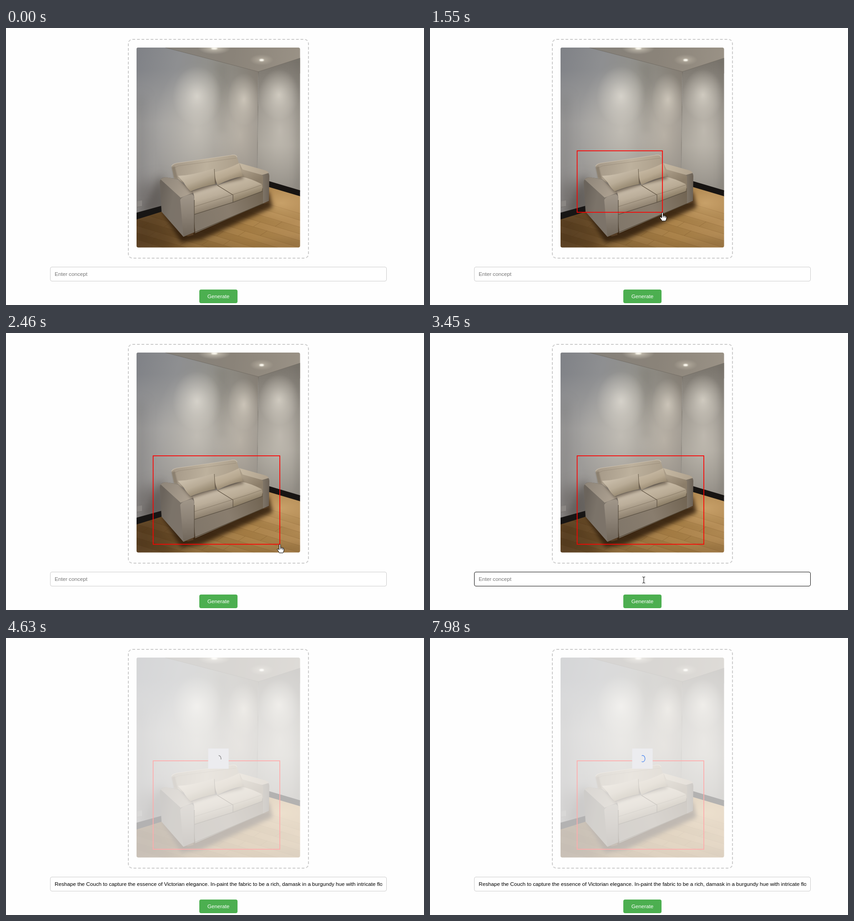
Recreate the animation shown at these times as an HTML page with a canvas. Size 919x609 px, loop 8 s.

```html
<!DOCTYPE html>
<html lang="en">
<head>
<meta charset="utf-8">
<title>Concept editor</title>
<style>
  html, body { margin: 0; width: 100%; height: 100%; overflow: hidden; background: #fefefe; }
  body { position: relative; font: 11.67px/30px "Liberation Sans", Arial, sans-serif; }
  body > * { position: absolute; box-sizing: border-box; }
  canvas { left: 0; top: 0; }
  #drop { left: 268px; top: 24px; width: 398px; height: 483px; border: 2px dashed #ccc; border-radius: 10px; }
  #field { left: 97px; top: 525px; width: 740px; height: 32px; padding: 0 9px; border: 1px solid #ccc; border-radius: 4px; background: #fff; }
  #field.focus { border-color: #101010; }
  #text { overflow: hidden; white-space: pre; color: #757575; }
  #text.typed { color: #000; }
  #button { left: 425px; top: 574.5px; width: 84px; height: 30.5px; border-radius: 4px; background: #4caf50; color: #fff; text-align: center; }
</style>
</head>
<body>
<div id="drop"></div>
<div id="field"><div id="text"></div></div>
<div id="button">Generate</div>
<canvas id="stage" width="919" height="609"></canvas>
<script>
const W = 919, H = 609, LOOP = 8000;
const FOCUS = 3400, PASTE = 3850, BLUR = 4520, LOADING = 4630;
const DRAG = 1210, ORIGIN = [323.5, 270];
const PROMPT = 'Reshape the Couch to capture the essence of Victorian elegance. In-paint the fabric to be a rich, damask in a burgundy hue with intricate floral patterns.';
const ctx = document.getElementById('stage').getContext('2d');
const field = document.getElementById('field');
const text = document.getElementById('text');

// time, x, y of the pointer tip
const pointerPath = [
  [220, 462, 461], [920, 323, 269], [1030, 323, 269], [1120, 318, 259],
  [DRAG, 323, 270], [1550, 510.5, 405], [1720, 592, 443], [1890, 592, 443],
  [2460, 602, 464.5], [2740, 602, 464.5], [2850, 600, 453], [3390, 470, 543],
  [3790, 470, 543], [4020, 466, 590]
];

function pointerAt(t) {
  const i = pointerPath.findIndex(k => k[0] > t);
  if (i < 0) return pointerPath[pointerPath.length - 1].slice(1);
  if (i === 0) return pointerPath[0].slice(1);
  const [t0, x0, y0] = pointerPath[i - 1], [t1, x1, y1] = pointerPath[i];
  const p = (t - t0) / (t1 - t0);
  return [x0 + (x1 - x0) * p, y0 + (y1 - y0) * p];
}

function paintRoom() {
  const room = document.createElement('canvas');
  room.width = W;
  room.height = H;
  const c = room.getContext('2d');

  const ramp = (x0, y0, x1, y1, ...colors) => {
    const g = c.createLinearGradient(x0, y0, x1, y1);
    colors.forEach((color, i) => g.addColorStop(i / (colors.length - 1), color));
    return g;
  };
  const shape = (d, fill, blur = 0) => {
    c.filter = blur ? `blur(${blur}px)` : 'none';
    c.fillStyle = fill;
    c.fill(new Path2D(d));
    c.filter = 'none';
  };
  const line = (d, color, width = 1) => {
    c.strokeStyle = color;
    c.lineWidth = width;
    c.stroke(new Path2D(d));
  };
  const glow = (x, y, rx, ry, rgb, alpha) => {
    c.save();
    c.translate(x, y);
    c.scale(rx, ry);
    const g = c.createRadialGradient(0, 0, 0, 0, 0, 1);
    g.addColorStop(0, `rgba(${rgb},${alpha})`);
    g.addColorStop(0.5, `rgba(${rgb},${alpha * 0.45})`);
    g.addColorStop(1, `rgba(${rgb},0)`);
    c.fillStyle = g;
    c.fillRect(-1, -1, 2, 2);
    c.restore();
  };
  const within = (d, draw) => {
    c.save();
    c.clip(new Path2D(d));
    draw();
    c.restore();
  };

  c.beginPath();
  c.roundRect(287, 43, 359.5, 439.5, 4);
  c.clip();

  // ceiling
  shape('M287 43H647V100H287Z', ramp(350, 43, 647, 80, '#84807a', '#8a8379', '#9a9286'));
  glow(458, 44, 36, 14, '255,248,230', 0.6);
  glow(562, 70, 26, 12, '255,245,225', 0.35);

  // walls
  const leftWall = 'M287 43H350L555 96L552 345L287 412Z';
  within(leftWall, () => {
    shape(leftWall, ramp(287, 60, 555, 120, '#808287', '#8e8f91', '#929089', '#817a70'));
    shape(leftWall, ramp(0, 90, 0, 330, 'rgba(182,178,172,0)', 'rgba(182,178,172,.5)', 'rgba(164,159,153,.55)'));
    shape('M460 70L487 78L486 230H464Z', 'rgba(112,107,99,.25)', 8);
    glow(420, 150, 54, 66, '246,242,233', 0.6);
    glow(420, 225, 95, 150, '228,222,211', 0.45);
    glow(523, 157, 36, 58, '242,235,221', 0.55);
    glow(515, 235, 60, 130, '222,212,196', 0.42);
    shape('M287 150H305V430H287Z', 'rgba(90,90,94,.28)', 12);
    shape('M287 345L345 330L365 415H287Z', 'rgba(82,77,74,.45)', 15);
    shape('M340 322L300 405L360 400Z', 'rgba(76,71,68,.45)', 7);
  });
  const rightWall = 'M555 96L647 66V360L552 331Z';
  within(rightWall, () => {
    shape(rightWall, ramp(0, 75, 0, 350, '#7a756d', '#99948c', '#a6a198', '#948f87'));
    glow(600, 147, 44, 56, '244,239,227', 0.58);
    glow(602, 225, 62, 140, '224,218,207', 0.45);
    shape('M638 60H650V370H638Z', 'rgba(100,96,90,.25)', 7);
  });
  line('M555 96L552 331', 'rgba(95,90,82,.5)');
  line('M350 43L555 96L647 66', 'rgba(85,80,73,.4)');
  shape('M288 381L299 379V393L288 395Z', '#8a8683');
  line('M288 394L299 392', '#6c6865');

  // floor
  const floor = 'M287 420L345 401L552 341L578 348L647 369V483H287Z';
  within(floor, () => {
    shape(floor, ramp(290, 470, 640, 370, '#664a2a', '#93703f', '#a67e46', '#b48c56'));
    for (let i = 0; i < 14; i++) {
      const y = 300 + i * 15;
      shape(`M287 ${y}L647 ${y + 108}V${y + 123}L287 ${y + 15}Z`, i % 2 ? 'rgba(255,216,150,.05)' : 'rgba(90,50,10,.04)');
      line(`M287 ${y}L647 ${y + 108}`, 'rgba(95,58,20,.22)', 0.8);
      for (let j = 0; j < 3; j++) {
        const x = 310 + (i * 83 + j * 131) % 330, z = y + (x - 287) * 0.3;
        line(`M${x} ${z}l-15 10`, 'rgba(95,58,20,.3)', 0.8);
      }
    }
    glow(605, 385, 75, 42, '255,218,160', 0.3);
    shape('M280 415L345 395L390 465L350 490H280Z', 'rgba(50,32,12,.4)', 12);
    shape('M340 490V472L530 478L660 462V490Z', 'rgba(75,48,18,.25)', 10);
    shape('M338 395L385 472L430 465L586 394L578 360Z', 'rgba(38,22,8,.8)', 5);
  });
  shape('M287 406L345 390V403L287 421Z', '#171514');
  shape('M576 336L647 357V370L576 349Z', '#171412');

  // sofa back and inner right arm
  shape('M364 304Q366 299 376 297L493 280Q506 277 508 284L518 320L420 352L370 332Z', ramp(370, 300, 510, 320, '#a69a89', '#bdb19d', '#ab9e8a'));
  line('M364 304Q366 299 376 297L493 280Q506 277 508 284', '#cbbfad', 1.2);
  line('M369 308L380 303L506 286', 'rgba(120,108,92,.4)', 0.8);
  shape('M364 306L371 304L378 332L369 330Z', 'rgba(100,89,76,.4)', 1);
  shape('M512 299L567 318V356L515 340Z', ramp(520, 315, 540, 345, '#aa9c87', '#8b7d69'));

  // base and seat cushions
  shape('M412 400L565 352V386L416 451Z', ramp(414, 430, 565, 365, '#81776a', '#897d6e', '#726553'));
  shape('M405 361Q450 343 466 346L500 367V382L414 409L410 368Z', ramp(440, 345, 455, 398, '#cdc1af', '#bbae9a', '#8d806e'));
  shape('M462 347L518 327Q536 330 562 343Q565 350 562 359L500 382V367Z', ramp(515, 330, 530, 375, '#c8bba6', '#b9ab95', '#85775f'));
  line('M413 393Q455 380 499 366Q530 357 562 345', 'rgba(95,83,68,.45)');
  line('M414 410L500 383L564 359', '#574d3f', 1.3);
  line('M465 346L499 367V383', '#5d5141', 1.2);
  line('M416 449L565 386', '#4c402f', 1.2);

  // arms
  shape('M513 298L570 314Q579 317 579 325L578 380L565 386V326Q562 320 522 311Z', ramp(564, 0, 580, 0, '#807668', '#6a6055'));
  shape('M513 297L570 313Q578 316 577 319L563 323L520 311Z', ramp(515, 300, 574, 322, '#c5b8a2', '#b0a28e'));
  shape('M338 339Q339 329 350 328L378 332L411 361Q414 367 414 376V449L390 459L342 404Z', ramp(340, 380, 390, 390, '#6b645c', '#7b7369', '#7c7369'));
  shape('M340 333Q345 328 352 328L378 333L412 362L384 373Z', ramp(345, 330, 400, 366, '#8f867a', '#aca090'));
  shape('M383 378Q386 371 398 368L408 365Q413 366 414 377V449L390 459Z', ramp(0, 365, 0, 458, '#a1978a', '#8b8175', '#70665a'));
  line('M414 378V449', '#584d40', 1.2);
  shape('M395 457L412 450V455L401 458Z', '#543c24');
  shape('M566 386L577 381V384L568 387Z', '#543c24');

  // pillows
  shape('M384 335L407 363L464 345L523 331L518 322Z', 'rgba(70,58,44,.6)', 3);
  shape('M378 325Q410 324 456 309Q460 311 459 319Q458 331 461 343Q430 349 406 359Q396 350 391 340Z', ramp(410, 317, 425, 355, '#c9bdaa', '#b9ac97', '#95876f'));
  shape('M458 317Q485 311 513 297Q515 310 521 326Q494 330 465 345Q460 334 458 317Z', ramp(480, 308, 493, 340, '#c5b7a1', '#b7a890', '#92836b'));
  line('M458 310L460 343', '#655847');

  // lamps
  c.filter = 'blur(1px)';
  c.fillStyle = '#fffdf4';
  for (const [x, y, rx, ry] of [[458, 45, 7, 2], [562, 70.5, 5, 2.5]]) {
    c.beginPath();
    c.ellipse(x, y, rx, ry, 0, 0, 7);
    c.fill();
  }
  c.filter = 'none';
  return room;
}

const room = paintRoom();
const hand = new Path2D('M-1.5 1Q0 -1 1.5 1V8Q2 6.5 4 7.5Q6 6.8 6.5 8.5Q9 8 9 10.5V14Q8 17 7 19H-1Q-3 15 -5.5 12Q-6 9.5 -3.5 10.5L-1.5 12Z');
const beam = new Path2D('M-3 -7Q0 -7 0 -5V5Q0 7 -3 7M3 -7Q0 -7 0 -5M0 5Q0 7 3 7');

function drawPointer(x, y) {
  const overField = x > 97 && x < 837 && y > 525 && y < 557;
  ctx.save();
  ctx.translate(x, y);
  ctx.strokeStyle = '#000';
  ctx.lineWidth = 1;
  if (!overField) {
    ctx.fillStyle = '#fff';
    ctx.fill(hand);
    ctx.stroke(new Path2D('M1.5 8V11M4 8V11M6.5 9V12'));
  }
  ctx.stroke(overField ? beam : hand);
  ctx.restore();
}

function drawSpinner(t) {
  const dt = t - LOADING;
  const phase = dt / 865 + 0.225;
  const span = 20 + 260 * Math.cos(Math.PI * phase) ** 4;
  const middle = -29.3 + 0.4405 * dt - 10.8 * Math.sin(2 * Math.PI * phase);
  const rad = Math.PI / 180;
  const tint = Math.min(1, dt / 300);
  const mix = (a, b) => Math.round(a + (b - a) * tint);
  ctx.fillStyle = '#ececef';
  ctx.fillRect(444.5, 243, 45, 44.5);
  ctx.strokeStyle = `rgb(${mix(130, 82)},${mix(130, 140)},${mix(130, 240)})`;
  ctx.lineWidth = 1.3;
  ctx.beginPath();
  ctx.ellipse(467.7, 265.3, 5, 7, 0, (middle - span / 2) * rad, (middle + span / 2) * rad);
  ctx.stroke();
}

function draw(t) {
  const [x, y] = pointerAt(t);
  const typed = t >= PASTE;
  const label = typed ? PROMPT : 'Enter concept';
  if (text.textContent !== label) text.textContent = label;
  text.className = typed ? 'typed' : '';
  field.className = t >= FOCUS && t < BLUR ? 'focus' : '';

  ctx.clearRect(0, 0, W, H);
  ctx.drawImage(room, 0, 0);
  if (t > DRAG) {
    const [ex, ey] = pointerAt(Math.min(t, 2460));
    ctx.strokeStyle = '#f00';
    ctx.lineWidth = 1.7;
    ctx.strokeRect(...ORIGIN, ex - ORIGIN[0], ey - ORIGIN[1]);
  }
  if (t >= LOADING) {
    ctx.fillStyle = 'rgba(255,255,255,.67)';
    ctx.fillRect(287, 43, 360, 440);
    drawSpinner(t);
  }
  if (t >= 220 && t < BLUR) drawPointer(x, y);
}

const start = performance.now();
function tick() {
  draw((performance.now() - start) % LOOP);
  requestAnimationFrame(tick);
}
tick();
</script>
</body>
</html>
```
